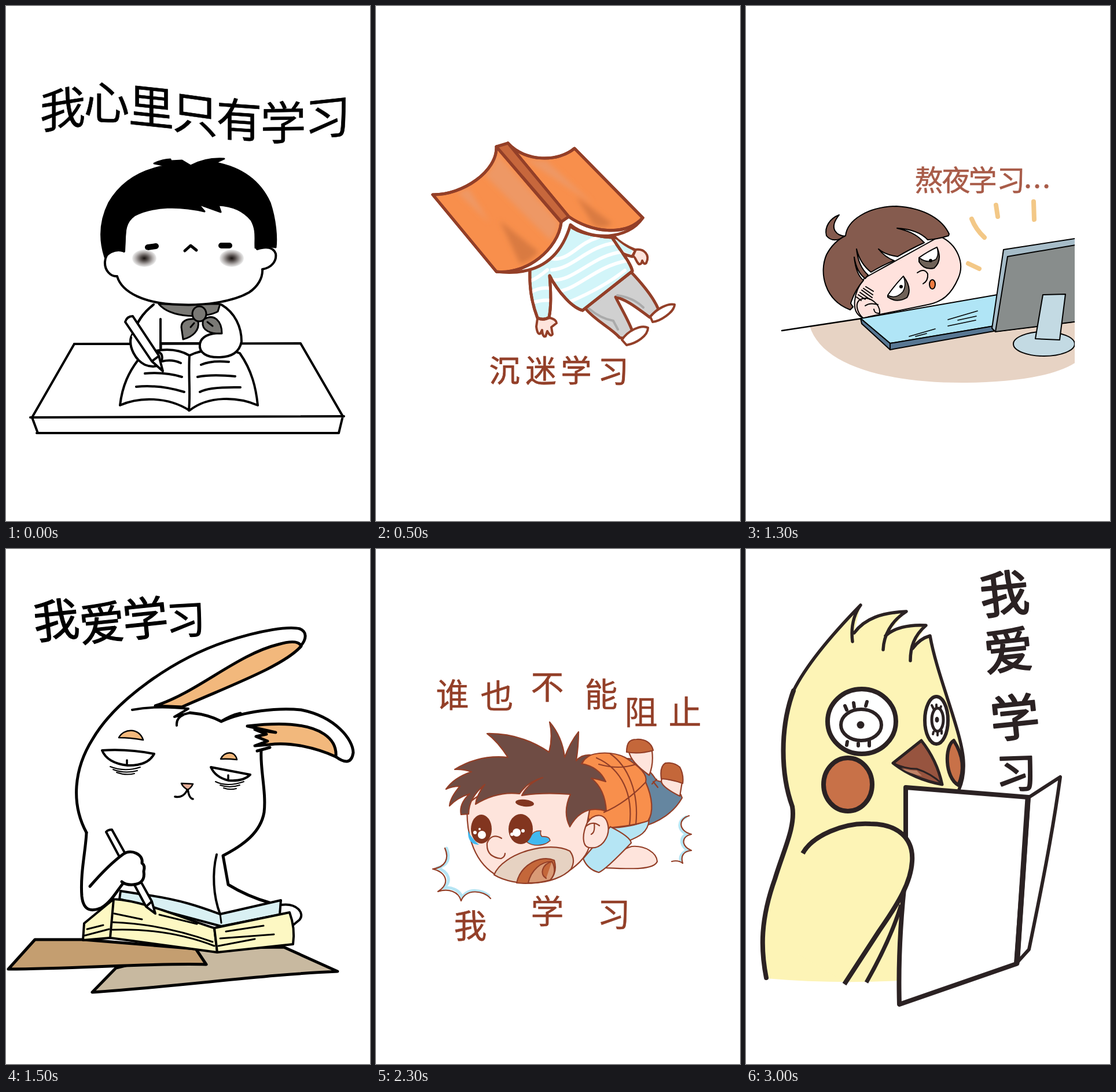
An HTML page for the animation above (3030 ms loop, 629 by 890 pixels).

```html
<!DOCTYPE html>
<html lang="zh">
<head>
<meta charset="utf-8">
<title>学习</title>
<style>
html, body { margin: 0; width: 100%; height: 100%; overflow: hidden; background: #fff; }
svg { display: block; width: 100%; height: 100%; }
svg > g { fill: none; stroke-linecap: round; stroke-linejoin: round; display: none; }
text { font-family: "Noto Sans CJK SC", "Noto Sans CJK", sans-serif; text-anchor: middle; }
.w { fill: #fff; }
.n { stroke: none; }
.skin { fill: #fee4dc; }
#desk { stroke: #000; stroke-width: 4; }
#desk text { font-size: 79px; fill: #000; stroke-width: .6; }
#nap { stroke: #933f28; stroke-width: 5; }
#nap text { font-size: 53px; fill: #933f28; stroke-width: .8; }
#night { stroke: #000; stroke-width: 2; }
#night text { font-size: 49px; fill: #a85b48; stroke: #a85b48; stroke-width: .6; }
#rabbit { stroke: #000; stroke-width: 5; }
#rabbit text { font-size: 79px; fill: #000; stroke-width: 1.2; }
#rabbit .small { font-size: 68px; }
#run { stroke: #933f28; stroke-width: 2.2; }
#run text { font-size: 57px; fill: #933f28; stroke-width: .5; }
#bird { stroke: #2b2223; stroke-width: 8; }
#bird text { font-size: 85px; fill: #2b2223; stroke-width: 2.5; }
#bird .small { font-size: 70px; }
</style>
</head>
<body>
<svg viewBox="0 0 629 890">
<defs>
  <radialGradient id="blush">
    <stop offset="0" stop-color="#181210"/><stop offset=".3" stop-color="#554e4c"/>
    <stop offset=".7" stop-color="#b5b1b0"/><stop offset="1" stop-color="#efefef"/>
  </radialGradient>
  <filter id="soft"><feGaussianBlur stdDeviation="4"/></filter>
  <clipPath id="shirt"><path id="shirtShape" d="M335 380C350 392 380 398 408 400C420 420 440 443 443 458L357 526C340 522 315 495 300 466C302 490 303 520 299 538Q290 544 279 539C268 510 265 485 266 455C300 440 325 415 335 380Z"/></clipPath>
  <clipPath id="edge"><path d="M0 0H568V890H0Z"/></clipPath>
</defs>

<g id="desk">
  <text transform="translate(98 177) skewY(-9)" y="30">我</text>
  <text transform="translate(174 166) skewY(1)" y="30">心</text>
  <text transform="translate(251 174) skewY(6)" y="30">里</text>
  <text transform="translate(327 186) skewY(8)" y="30">只</text>
  <text transform="translate(403 196) skewY(4)" y="30">有</text>
  <text transform="translate(479 201) skewY(-1)" y="30">学</text>
  <text transform="translate(556 192) skewY(-6)" y="30">习</text>
  <path class="w" d="M118 584L509 583L582 709L45 711ZM42 711L584 709M45 711L55 738H575L582 709M53 738H574"/>
  <path class="w" d="M255 516C232 534 227 548 216 573C212 590 224 612 240 620Q254 626 268 620L267 541V520"/>
  <path class="w n" d="M255 516H372C395 528 405 550 407 580L267 581Z"/>
  <path d="M255 516C232 534 227 548 216 573M267 541V596M118 584H213M267 583H336"/>
  <path class="w" d="M228 612C245 592 290 588 317 604C345 590 385 592 404 600C425 630 432 660 435 690C400 675 350 673 317 699C280 675 230 675 197 690C201 655 213 632 228 612ZM317 604C315 640 319 670 316 699"/>
  <path d="M270 614Q287 610 302 617M240 635Q275 632 304 641M225 658Q265 654 308 667M337 620Q355 612 385 615M331 641Q355 636 396 640M335 667Q350 658 405 659"/>
  <path class="w" d="M372 516C396 530 407 555 407 580C403 599 390 606 370 607C346 608 333 599 335 584C337 572 350 565 372 565"/>
  <path class="w n" d="M216 573L232 545L263 600L268 619Q250 626 236 617Q216 603 216 573Z"/>
  <path d="M216 573C212 590 224 612 240 620Q254 626 268 620M258 597Q273 598 269 613"/>
  <path class="w" d="M206 546Q209 536 219 536L264 604L271 631L252 614ZM252 614L264 605"/>
  <g fill="#7a7975" stroke-width="3">
    <path d="M264 515C285 540 345 540 366 528L370 515Z"/>
    <path d="M328 541C311 540 303 545 303 555L306 576C323 572 335 560 332 545ZM319 555L325 548M341 542C360 530 373 545 373 566C354 567 338 561 340 546ZM357 553L348 546"/>
    <ellipse cx="334" cy="532" rx="12" ry="13"/>
  </g>
  <path class="w" d="M204 424C188 415 172 425 171 442C170 457 181 468 192 467C200 495 240 515 300 516C340 518 390 512 420 495C435 485 444 470 443 455C460 452 468 440 466 428C462 417 450 415 434 420L430 335H208Z"/>
  <path fill="#000" stroke-width="3" d="M171 434C160 400 163 370 178 340C200 302 235 283 277 276L256 272Q272 265 284 265L285 268L304 267L319 276Q345 262 377 264L362 271C410 280 440 305 456 340C466 370 468 400 466 417Q448 414 431 418C430 402 434 388 424 370C410 353 390 345 367 344L371 356L332 342L343 355C300 345 255 345 222 362C203 375 206 395 204 424Q186 418 171 434Z"/>
  <path stroke-width="10" d="M245 417L259 415M372 414H386"/>
  <path stroke-width="5" d="M309 423L319 414L329 422"/>
  <g class="n" fill="url(#blush)"><ellipse cx="239" cy="436" rx="21" ry="15"/><ellipse cx="390" cy="436" rx="21" ry="15"/></g>
</g>

<g id="nap">
  <path class="w" d="M395 398L410 397C420 408 435 417 449 422L443 433Q425 430 408 416Z"/>
  <path class="n" fill="#d2f5f9" d="M405 400L416 404Q428 415 443 422L440 430L412 416Z"/>
  <path class="skin" stroke-width="4" d="M449 421C463 419 474 430 467 444Q463 448 460 440Q459 447 454 446C448 440 449 434 444 432Z"/>
  <path fill="#d0d0d0" d="M361 522L441 460C460 480 480 505 488 524L473 538C455 525 435 508 414 503C425 525 440 550 444 565Q432 577 421 573C405 555 380 545 361 522Z"/>
  <path stroke="#aaa" stroke-width="4" d="M368 523Q388 540 410 544L418 559M417 500Q445 504 462 521"/>
  <path class="w" stroke-width="4" d="M425 577C435 561 458 550 470 556C470 570 450 583 433 586ZM474 537C485 523 505 513 516 516C515 530 490 545 478 546Z"/>
  <path class="skin" stroke-width="4" d="M279 540L277 554Q279 569 284 566L287 560Q288 573 293 571L296 562Q302 573 305 567L303 555L312 548Q312 542 301 539Z"/>
  <use href="#shirtShape" fill="#d2f5f9"/>
  <g clip-path="url(#shirt)" stroke="#fff" stroke-width="6">
    <path d="M305 437C335 440 348 410 384 400M304 456C340 454 365 415 415 409M304 473C340 478 375 430 425 425M316 493C350 488 380 450 434 440M335 511Q390 488 430 457M265 476Q280 470 296 456M266 496Q282 485 302 488M270 513Q287 507 304 509"/>
  </g>
  <use href="#shirtShape"/>
  <path class="w" d="M208 459C275 467 318 440 336 378C370 406 435 405 461 366L333 364L320 373Z"/>
  <path fill="#f88f4c" d="M98 326C150 327 210 285 208 243L320 374C315 420 260 465 208 459Z"/>
  <path fill="#f88f4c" d="M228 237C258 270 315 270 343 246L461 366C430 400 370 390 333 364Z"/>
  <g class="n" filter="url(#soft)">
    <path fill="#ee9865" d="M209 255L316 375Q312 394 301 405L188 292Q205 277 209 255ZM141 323L160 315L196 374ZM247 258Q267 269 294 267L375 342Z"/>
    <path fill="#cf733f" opacity=".75" d="M214 371L281 425Q266 442 249 446ZM346 329L408 376Q391 387 376 379Z"/>
  </g>
  <path d="M98 326C150 327 210 285 208 243L320 374C315 420 260 465 208 459ZM228 237C258 270 315 270 343 246L461 366C430 400 370 390 333 364Z"/>
  <path fill="#c7673c" d="M208 243L228 237L333 364L320 373Z"/>
  <text x="222 285 346 410" y="650 650 650 651">沉迷学习</text>
</g>

<g id="night" clip-path="url(#edge)">
  <path class="n" fill="#e7d3c4" d="M110 553C130 620 240 652 380 651C460 650 540 640 575 612V546H430L198 541Z"/>
  <path stroke-width="2.6" d="M62 561L200 540"/>
  <path fill="#ffe2dd" d="M335 398C366 412 378 445 367 470C355 498 340 512 310 517L202 539C180 530 185 495 205 470Z"/>
  <path fill="#ffe2dd" d="M231 530C232 515 213 500 198 507C187 513 192 530 202 539M228 516Q214 512 206 518M231 531Q222 532 221 524"/>
  <path d="M207 485L220 493M203 488L219 499M200 491L218 504M197 495L214 507M194 499L206 507M191 503L199 509"/>
  <path fill="#855b4e" d="M161 361C145 367 135 382 139 397Q150 411 172 398C158 397 141 386 161 361Z"/>
  <path fill="#855b4e" d="M180 525C135 508 126 460 139 430Q151 407 172 397C175 370 210 347 260 346C310 349 340 370 351 394L350 397Q331 403 314 404Q297 386 261 384C288 390 299 399 308 409Q282 421 262 433Q240 430 229 420Q240 434 256 440Q236 448 216 460Q197 445 191 420Q194 450 211 465L206 471Q191 460 187 434Q190 464 203 474Q187 493 181 514L185 520Z"/>
  <path fill="#6f6258" d="M299 435Q315 424 330 417Q340 440 325 453Q308 457 299 442ZM245 500Q255 485 272 467Q288 488 278 504Q260 514 245 503Z"/>
  <path class="w" stroke-width="1.6" d="M299 435Q315 424 330 417Q334 430 328 438Q314 446 299 435ZM245 500Q255 485 272 467Q278 482 271 494Q259 507 245 500Z"/>
  <g class="n" fill="#000"><circle cx="319" cy="440" r="3"/><circle cx="268" cy="485" r="3"/></g>
  <path d="M296 461Q308 452 314 463Q315 475 306 480"/>
  <ellipse cx="322" cy="481" rx="5" ry="8" fill="#ee7c41"/>
  <path fill="#b0e5f6" d="M198 540L434 499L429 553L249 583Z"/>
  <path fill="#587793" d="M249 583L428 553V562L249 594Z"/>
  <path fill="#587793" d="M198 540L249 583V594L200 549Z"/>
  <path stroke-width="1.6" d="M349 542L400 527M366 543L398 536M282 571L327 558M293 571L312 566M349 553L397 543"/>
  <path fill="#a6bcc8" d="M445 421L575 401V545L431 563L425 557Z"/>
  <path fill="#888d8c" d="M452 433L575 412V545L431 563Z"/>
  <path class="n" fill="#e7d3c4" d="M431 564L568 547V560L480 566Z"/>
  <ellipse cx="515" cy="584" rx="53" ry="21" fill="#c3dae3"/>
  <path fill="#c3dae3" d="M513 499L552 498L542 577L500 575Z"/>
  <g stroke="#f3c887" stroke-width="8"><path d="M390 368Q397 386 412 400M432 344L435 364M497 338L498 369M384 445L403 454"/></g>
  <text x="316 363 409 458 487 503 519" y="319 319 319 319 314 314 314">熬夜学习...</text>
</g>

<g id="rabbit">
  <text x="90 169 244" y="156 161 153" rotate="-6">我爱学</text>
  <text class="small" x="312" y="149" rotate="-3">习</text>
  <path fill="#c8b9a0" d="M190 724L149 766C300 756 450 735 573 730L480 688L330 690Z"/>
  <path fill="#c49e70" d="M50 675H133L328 691L346 718C250 715 120 726 4 726Z"/>
  <path d="M139 490C112 440 117 380 150 328C190 260 290 190 380 160C440 140 490 133 508 138C520 143 520 155 509 168"/>
  <path fill="#f2b87c" d="M258 271C330 248 400 182 470 165Q505 155 510 168C480 202 390 235 304 273Z"/>
  <path stroke-width="4" d="M218 278Q260 270 315 276L291 290L318 283M306 287Q294 292 295 305"/>
  <path d="M318 283Q350 286 372 298C410 280 470 274 510 278C570 290 600 330 600 352Q596 378 570 359M372 298Q390 287 405 284"/>
  <path fill="#f2b87c" d="M417 306C470 300 520 300 550 320Q572 335 570 359C535 343 490 333 455 338L430 340L452 332L432 324L450 320L430 312L466 317Z"/>
  <path d="M434 349L456 343M441 349C439 380 450 420 446 455C440 490 410 512 375 530L384 580C410 596 430 604 455 611"/>
  <path stroke-width="4" d="M364 528C356 560 358 600 370 631"/>
  <path d="M139 490C138 520 128 560 131 600C134 628 150 626 165 620C182 610 192 590 203 577"/>
  <path fill="#f2b87c" stroke-width="2.5" d="M195 326C203 310 230 308 237 330Q215 326 195 326ZM371 363C377 349 396 348 399 364Q382 362 371 363Z"/>
  <path class="w" stroke-width="4" d="M166 348Q210 345 256 354Q245 375 210 374Q175 370 166 348ZM354 377L422 390Q410 402 385 400Q362 395 354 377Z"/>
  <path stroke-width="3.5" d="M209 365V373M384 391V399M314 414C310 426 301 430 292 428M314 414Q316 431 323 432"/>
  <path stroke-width="2" d="M180 376Q205 386 232 377M185 381Q205 389 227 383M191 386Q207 392 222 388M362 402Q382 412 411 402M370 408Q386 414 404 408M376 413Q387 417 398 414"/>
  <path fill="#e8b09a" stroke-width="2.5" d="M303 405L323 406Q320 413 314 416Q306 412 303 405Z"/>
  <path class="w" stroke-width="4" d="M475 615C503 611 517 630 507 641L496 650"/>
  <path fill="#d9f0f3" stroke-width="4" d="M196 605L198 591L236 597C300 605 340 620 370 631L475 607L473 632L372 652Z"/>
  <path fill="#fdf8c3" stroke-width="4" d="M186 605L135 647L133 676L180 672ZM186 605C240 608 310 640 360 655L365 697L180 672Z"/>
  <path fill="#fdf8c3" stroke-width="4" d="M360 655L490 628Q500 655 496 683L365 697Z"/>
  <path stroke-width="3" d="M370 631L372 646M187 630L235 640M185 645Q270 648 357 679M184 658Q280 655 360 686M265 632L330 648M140 657L168 650M136 668L178 657M380 661L445 651M370 673L463 666M367 686L430 674"/>
  <path class="w" stroke-width="4" d="M173 489Q176 485 183 485L252 609L258 630L242 618ZM242 618L252 609"/>
  <path class="w" d="M145 583C165 560 185 540 203 527C217 518 238 528 235 543Q241 547 238 557C240 570 235 579 220 580Q207 581 200 575"/>
</g>

<g id="run">
  <path fill="#6586a0" d="M428 362C455 360 475 385 485 400C505 405 525 415 529 430C515 455 490 470 467 478L465 400Z"/>
  <path class="skin" d="M437 350Q440 368 472 391Q480 372 477 349ZM495 396Q485 407 525 427L529 403Z"/>
  <path fill="#c4673a" d="M433 351C433 335 438 329 450 329C465 328 476 335 479 348Q455 355 433 351ZM493 397Q490 376 500 370Q515 368 525 377Q532 390 530 405Q510 398 493 397Z"/>
  <path d="M477 406L485 398M479 402L487 412"/>
  <path fill="#b5e5f4" d="M400 482Q440 482 472 468C470 490 455 497 435 505Z"/>
  <path fill="#f88f4c" d="M362 360C380 350 410 350 430 360C455 375 470 390 466 403C478 430 480 455 470 470Q440 480 375 484L340 400Z"/>
  <path d="M466 403C445 425 420 444 394 455M405 354C435 375 455 420 449 476M381 361C425 380 445 425 438 478M385 372Q420 382 449 372"/>
  <path class="skin" d="M397 551C405 535 420 520 442 514C465 512 485 525 486 540C480 555 440 553 397 551Z"/>
  <path fill="#b5e5f4" d="M405 480C425 490 440 500 441 508C420 530 395 555 385 559C370 555 362 545 358 535Z"/>
  <path class="skin" d="M158 440C155 480 163 535 205 562C230 580 290 580 320 565C345 550 362 535 368 516C392 520 404 495 401 478C397 456 378 455 365 473L375 420L300 395L200 410Z"/>
  <path d="M365 473C355 495 357 514 368 516M362 480Q374 469 386 478M377 474Q379 490 372 493"/>
  <path fill="#6f4c44" d="M136 381Q178 355 228 360Q210 332 192 319Q250 318 299 351Q306 325 300 299Q322 325 326 360Q335 335 350 316Q350 340 346 366Q355 355 371 356Q360 362 355 371Q385 376 397 402Q385 398 372 396Q396 415 398 453Q357 440 335 480Q322 455 336 424Q290 420 252 426Q262 405 288 395Q262 402 248 423Q210 418 172 441Q174 425 188 407Q160 430 160 458L147 459Q143 440 162 423Q140 430 127 444Q128 430 145 410Q132 410 121 415Q135 395 165 385Q150 380 136 381Z"/>
  <path class="n" fill="#41b9f0" d="M159 487Q158 511 178 511Q165 500 159 487Z"/>
  <path fill="#41b9f0" stroke-width="1.6" d="M259 505C270 495 270 486 285 487Q283 494 287 497Q300 496 301 504C290 514 270 515 259 505Z"/>
  <g class="n" fill="#82351f">
    <ellipse cx="182" cy="484" rx="18" ry="25"/><ellipse cx="250" cy="484" rx="21" ry="26"/>
    <ellipse cx="257" cy="439" rx="16" ry="6" transform="rotate(6 257 439)"/>
  </g>
  <g class="n w">
    <circle cx="183" cy="494" r="7"/><circle cx="171" cy="490" r="3"/><circle cx="179" cy="484" r="2"/>
    <circle cx="243" cy="490" r="7"/><circle cx="254" cy="487" r="3"/><circle cx="235" cy="493" r="3"/>
  </g>
  <path d="M217 500Q200 490 192 508Q190 532 216 535Q223 532 223 526"/>
  <path fill="#e6d2c2" d="M204 563C220 525 300 503 335 522Q346 537 337 553C310 582 240 585 204 563Z"/>
  <path fill="#c4673a" d="M243 577C250 545 285 528 308 538Q314 558 301 572Q270 580 243 577Z"/>
  <path fill="#d99a76" d="M263 577C268 555 285 540 304 540Q314 558 301 572Q280 578 263 577ZM304 540C287 545 282 562 294 569"/>
  <g stroke="#b5e5f4" stroke-width="5">
    <path d="M122 517C129 535 124 547 106 551C125 557 133 575 116 586C130 583 145 590 149 602C160 585 183 589 195 599"/>
    <path d="M536 463C521 470 521 486 538 493C525 497 525 512 539 521C528 524 524 533 527 539"/>
  </g>
  <path d="M119 517C127 535 120 550 98 553C119 557 131 577 107 592C125 586 143 592 147 608C155 587 185 589 198 604M541 461C522 466 522 487 545 493C527 497 527 513 545 521C531 522 526 531 530 543Q522 537 511 540"/>
  <text x="132 209 296 389 458 534 163 296 411" y="273 275 259 272 303 303 672 647 652">谁也不能阻止我学习</text>
</g>

<g id="bird">
  <path class="n" fill="#fdf4b6" d="M35 742C25 690 25 640 50 570C65 520 88 480 80 445C60 390 58 310 82 245C107 195 158 138 198 97L187 145C205 120 235 110 277 108L241 150Q270 130 311 132L288 172Q300 155 318 150C330 220 375 320 376 370L368 418L275 412L265 746Q150 752 35 742Z"/>
  <path d="M35 741C25 690 25 640 50 570C65 520 86 480 80 445C60 390 58 310 82 245"/>
  <path stroke-width="5.5" d="M82 245C107 195 158 138 198 97C185 115 181 135 184 160M187 145C205 120 235 110 277 108C250 125 238 150 237 174M241 150C255 137 280 130 311 132C290 150 284 170 284 193M288 172Q300 155 318 150C330 220 375 320 376 370Q377 395 368 416"/>
  <ellipse class="w" cx="200" cy="298" rx="59" ry="56"/>
  <ellipse cx="199" cy="304" rx="35" ry="27" stroke-width="6"/>
  <path stroke-width="6" d="M171 271L174 278M186 266L187 273M209 264L207 271M175 333L174 339M194 336V340M213 332V340"/>
  <ellipse class="w" cx="329" cy="296" rx="20" ry="41" stroke-width="6"/>
  <ellipse cx="331" cy="295" rx="10" ry="20" stroke-width="5"/>
  <path stroke-width="4" d="M321 270L324 276M329 269V274M337 272L335 277M324 316L323 320M331 317V322M338 314V319"/>
  <g class="n" fill="#2b2223"><circle cx="198" cy="304" r="6.5"/><ellipse cx="330" cy="295" rx="3.5" ry="5"/></g>
  <g fill="#c87148">
    <ellipse cx="176" cy="407" rx="42" ry="46"/>
    <path stroke-width="6" d="M359 331C343 340 343 395 367 408Q384 370 359 331Z"/>
  </g>
  <path fill="#97543f" stroke-width="5" d="M254 370L303 331Q330 365 339 407Q290 398 254 370Z"/>
  <path stroke-width="3" d="M254 370Q275 380 295 380Q320 388 339 406"/>
  <path class="n" fill="#c08367" d="M268 379Q283 383 295 383L304 392Q284 389 268 379Z"/>
  <path class="w" d="M276 412L488 429L467 717L265 787Q262 680 276 560Z"/>
  <path class="w" stroke-width="6" d="M489 429L543 394C530 490 510 590 489 692L470 713Z"/>
  <path stroke-width="9" d="M487 432L468 716"/>
  <path class="n" fill="#fdf4b6" d="M97 527C115 495 170 470 215 475C262 475 290 500 287 540C285 575 268 605 268 605L205 747L170 748L90 700Z"/>
  <path d="M268 615Q250 675 208 749" stroke-width="7" stroke-linecap="butt"/>
  <path d="M98 526C115 495 170 472 215 475C262 475 290 500 287 540C285 575 265 610 230 660L170 752" stroke-linecap="butt"/>
  <text x="450 457 468" y="113 211 327" rotate="-6">我爱学</text>
  <text class="small" x="468" y="414" rotate="-2">习</text>
</g>
</svg>
<script>
const scenes = document.querySelectorAll('svg > g');
const HOLD = 500, LOOP = 3030;

function draw() {
  const now = performance.now() % LOOP;
  // the last scene also fills the short rest of the loop
  const current = Math.min(Math.floor(now / HOLD), scenes.length - 1);
  scenes.forEach((scene, i) => { scene.style.display = i === current ? 'inline' : 'none'; });
  requestAnimationFrame(draw);
}
draw();
</script>
</body>
</html>
```
